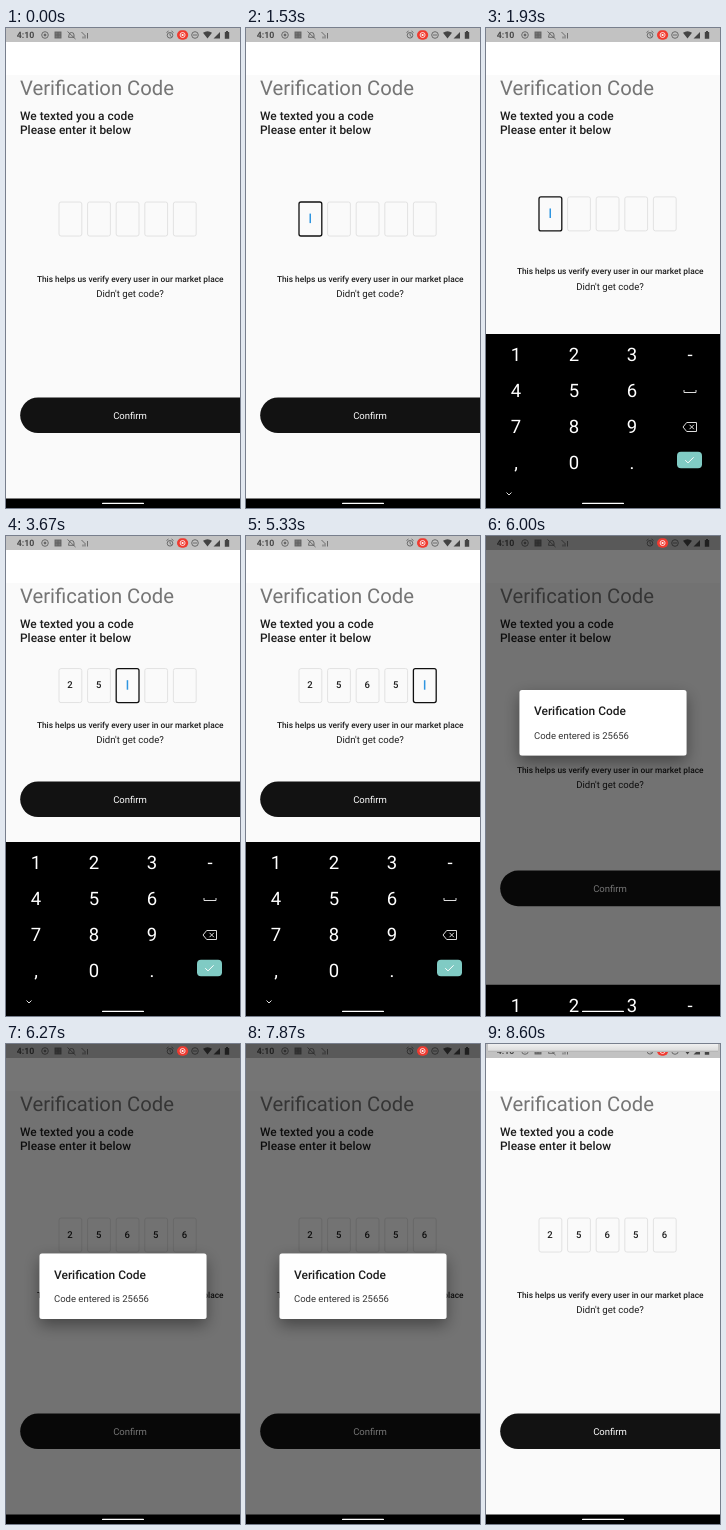
An HTML page that plays this animation: 234 px wide and 480 px high, repeating every 8.67 s.

```html
<!DOCTYPE html>
<html lang="en">
<head>
<meta charset="utf-8">
<title>Verification Code</title>
<style>
  html, body { margin: 0; width: 100%; height: 100%; overflow: hidden; background: #fafafa; }
  svg { display: block; width: 100vw; height: 100vh; font-family: Roboto, sans-serif; text-rendering: geometricPrecision; }
  .mid { text-anchor: middle; }
  .bold { font-weight: 500; }
  .line { fill: none; stroke: #606060; stroke-width: .9; }
  .key { font-size: 18.5px; fill: #fff; text-anchor: middle; }
  .keyLine { fill: none; stroke: #ddd; stroke-width: 1; }
</style>
</head>
<body>
<svg viewBox="0 0 234 480">
  <defs>
    <filter id="shadow" x="-25%" y="-60%" width="150%" height="240%">
      <feDropShadow dx="0" dy="6" stdDeviation="8" flood-opacity=".4"/>
    </filter>
    <linearGradient id="bannerFill" x2="0" y2="1">
      <stop offset="0" stop-color="#f0f0f0"/>
      <stop offset=".75" stop-color="#dedede"/>
      <stop offset="1" stop-color="#aaa"/>
    </linearGradient>
  </defs>

  <rect width="234" height="480" fill="#fafafa"/>
  <rect y="14" width="234" height="33" fill="#fff"/>
  <rect width="234" height="14" fill="#c2c2c2"/>

  <!-- status bar -->
  <text x="10.8" y="10.2" font-size="8.8" font-weight="700" fill="#484848">4:10</text>
  <g class="line">
    <circle cx="39" cy="7" r="3.3"/><circle cx="39" cy="7" r="1" fill="#606060"/>
    <rect x="49" y="4" width="6" height="6" fill="#777"/><path d="M49 7h6M52 4v6"/>
    <path d="M62.5 9.3H68V7a2.5 2.5 0 0 0-5 0zM61.5 3.5l8 7.5"/>
    <path d="M75.5 4l3 3M77 10.500v-2M79 10.500V7M81.500 10.500V5"/>
    <circle cx="164" cy="7.3" r="2.8"/><path d="M164 5.500v2l1.500 1M160.500 4.500l2-1.500M167.500 4.500l-2-1.500"/>
    <circle cx="189" cy="7" r="3.300"/><path d="M187 7h4"/>
  </g>
  <path d="M197 4.700q4.500-3 9 0L201.500 10.500zM207.500 10.500h6.500V4zM218.800 4h1.200V3h2v1h1.200v6.700h-4.400z" fill="#444"/>

  <text x="14" y="67" font-size="20.25" fill="#757575">Verification Code</text>
  <g class="bold" font-size="11.9" fill="#1c1c1c">
    <text x="14" y="92">We texted you a code</text>
    <text x="14" y="106">Please enter it below</text>
  </g>

  <g id="boxes"></g>
  <g id="notes" class="mid" fill="#1c1c1c">
    <text x="124.2" y="254" font-size="8.36" class="bold">This helps us verify every user in our market place</text>
    <text x="124" y="269.3" font-size="9.6">Didn't get code?</text>
  </g>
  <g id="confirm">
    <path d="M240 369.500H32a17.800 17.800 0 0 0 0 35.600H240z" fill="#121212"/>
    <text x="124" y="390.500" font-size="9.5" class="mid" fill="#fff">Confirm</text>
  </g>

  <g id="overlay">
    <rect width="234" height="480" opacity=".54"/>
    <g id="dialog">
      <rect x="33.500" y="209.500" width="167" height="65.500" rx="2.500" fill="#fff" filter="url(#shadow)"/>
      <text x="48" y="234.500" font-size="11.95" class="bold" fill="#1c1c1c">Verification Code</text>
      <text x="48" y="258" font-size="9.5" fill="#333">Code entered is 25656</text>
    </g>
  </g>
  <rect x="171" y="2.300" width="11.200" height="9.400" rx="4.700" fill="#f03a30"/>
  <circle cx="176.600" cy="7" r="2.500" fill="none" stroke="#fff" stroke-width=".8"/>
  <circle cx="176.600" cy="7" r="1.100" fill="#fff"/>

  <rect y="470.500" width="234" height="10"/>
  <g id="keyboard">
    <rect y="306" width="234" height="180"/>
    <rect id="press" x="59" width="59" height="37" rx="2" fill="#3a3a3a"/>
    <g id="keys"></g>
    <g class="keyLine">
      <path d="M198 362v2.500h12V362"/>
      <path d="M197 399l3.700-4.500h9.800v9h-9.800zM203.500 396.800l4.400 4.400M207.900 396.800l-4.400 4.400"/>
      <path d="M20.500 464.500l2.500 2.500 2.500-2.500"/>
    </g>
    <rect x="191" y="423.700" width="25" height="16.600" rx="4" fill="#80cbc4"/>
    <path d="M199.300 432.200l2.700 2.700 5.600-5.600" class="keyLine" style="stroke:#fff"/>
  </g>
  <rect x="96" y="474.700" width="42" height="1.300" rx=".6" fill="#fff"/>
  <rect id="banner" x="2" width="230" height="8" fill="url(#bannerFill)"/>
</svg>
<script>
const LOOP = 8670;
const code = "25656";
const typedAt = [2870, 3400, 4200, 5070, 5670];
const focusAt = [1270, 2900, 3430, 4230, 5100, 5680];
const cursorOn = [[1400, 2330], [3030, 3400], [3530, 3800], [4330, 4670], [5200, 5530]];
const presses = [[2730, 308], [3270, 344], [4930, 344]]; // time, key top

const $ = id => document.getElementById(id);
const ramp = (t, a, b) => Math.min(1, Math.max(0, (t - a) / (b - a)));
const easeOut = u => 1 - (1 - u) ** 2;
const shift = (id, y) => $(id).setAttribute("transform", `translate(0 ${y})`);

function add(parent, tag, attrs, text = "") {
  const el = document.createElementNS("http://www.w3.org/2000/svg", tag);
  for (const k in attrs) el.setAttribute(k, attrs[k]);
  el.textContent = text;
  return parent.appendChild(el);
}

["123-", "456", "789", ",0."].forEach((row, r) =>
  [...row].forEach((ch, c) =>
    add($("keys"), "text", { x: 30 + 58 * c, y: 333.3 + 35.9 * r, class: "key" }, ch)));

const boxes = [...code].map((ch, i) => {
  const x = 53 + 28.6 * i, g = $("boxes");
  return {
    frame: add(g, "rect", { x, y: 174, width: 22.8, height: 34, rx: 2, fill: "#fafafa" }),
    digit: add(g, "text", { x: x + 11, y: 193.8, "font-size": 9.5, class: "mid bold", fill: "#1c1c1c" }, ch),
    cursor: add(g, "rect", { x: x + 10.5, y: 185.6, width: 1.5, height: 9.5, fill: "#2f95e0" })
  };
});

function draw(t) {
  boxes.forEach(({ frame, digit, cursor }, i) => {
    const focus = ramp(t, focusAt[i], focusAt[i] + 170) *
      (1 - ramp(t, focusAt[i + 1], focusAt[i + 1] + 170));
    const grey = Math.round(226 - 210 * focus);
    const [on, off] = cursorOn[i];
    frame.setAttribute("stroke", `rgb(${grey},${grey},${grey})`);
    frame.setAttribute("stroke-width", 1 + 0.3 * focus);
    digit.setAttribute("opacity", +(t >= typedAt[i]));
    cursor.setAttribute("opacity", +(t >= on && t < off));
  });

  // The page and dialog follow the keyboard with a delay.
  const lift = t < 4000
    ? 0.11 * ramp(t, 1870, 1930) + 0.89 * ramp(t, 1930, 1995)
    : 1 - easeOut(ramp(t, 5925, 6087));
  shift("boxes", -41.4 * lift);
  shift("notes", -62 * lift);
  shift("confirm", -124 * lift);

  const up = easeOut(ramp(t, 1590, 1870)) - easeOut(ramp(t, 5880, 6092));
  shift("keyboard", 175 * (1 - up));

  const hit = presses.find(([at]) => t >= at && t < at + 220);
  $("press").setAttribute("opacity", hit ? 1 - ramp(t, hit[0] + 100, hit[0] + 220) : 0);
  if (hit) $("press").setAttribute("y", hit[1]);

  $("overlay").setAttribute("opacity", ramp(t, 5710, 5860) - ramp(t, 7870, 8120));
  shift("dialog", -87.5 * (1 - easeOut(ramp(t, 5945, 6220))));

  shift("banner", -8 + 8 * ramp(t, 8470, 8600));
}

function tick() {
  draw(performance.now() % LOOP);
  requestAnimationFrame(tick);
}
tick();
</script>
</body>
</html>
```
